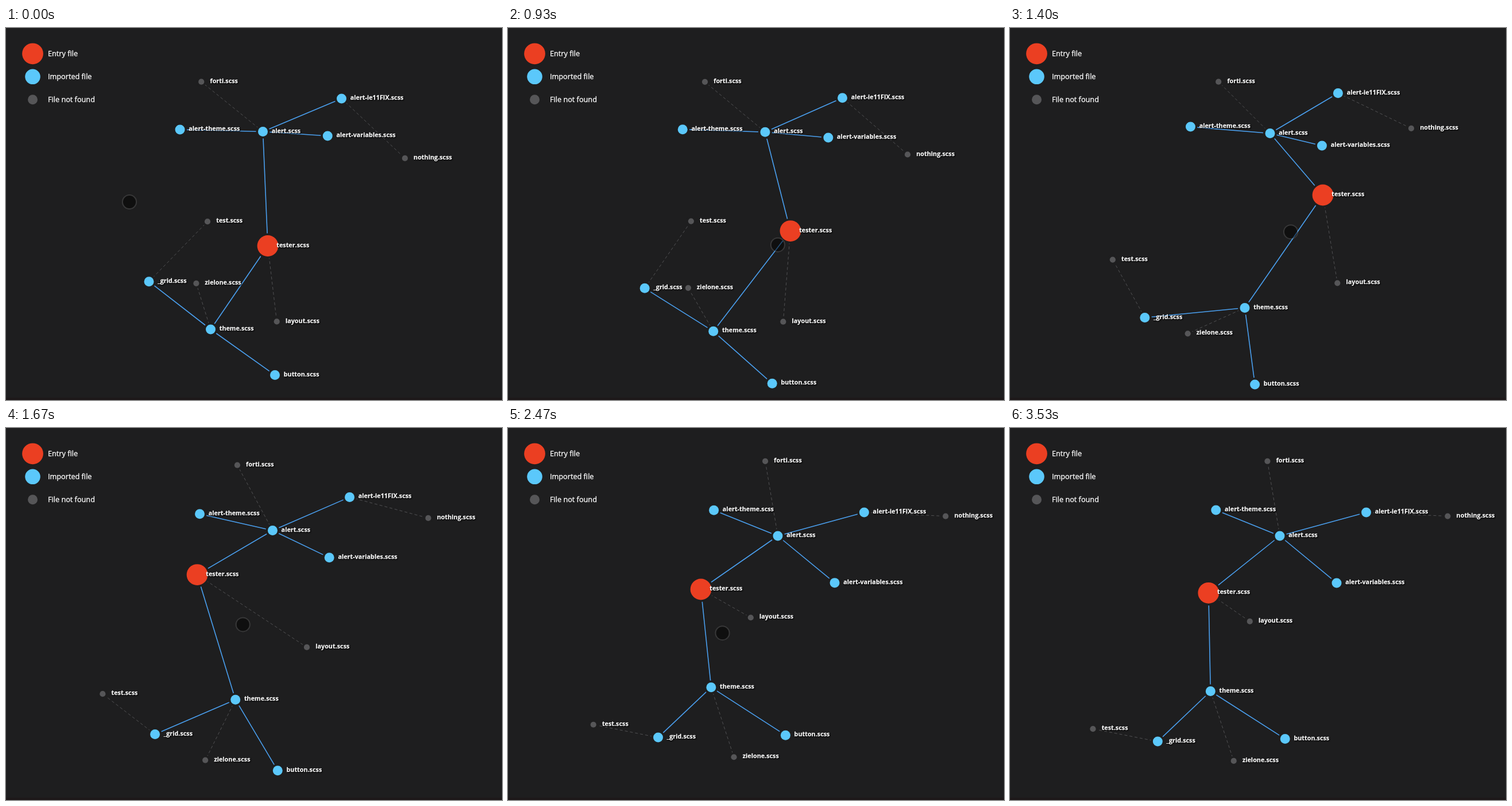
Recreate the animation shown at these times as an HTML page with a canvas. Size 864 px wide and 648 px high, loop 4.27 s.

```html
<!DOCTYPE html>
<html lang="en">
<head>
<meta charset="utf-8">
<title>Import graph</title>
<style>
  html, body { margin: 0; width: 100%; height: 100%; overflow: hidden; background: #1e1e1f; }
  canvas { display: block; }
</style>
</head>
<body>
<canvas id="stage" width="864" height="648"></canvas>
<script>
const ctx = document.getElementById('stage').getContext('2d');
const BG = '#1e1e1f';
const FONT = '"Open Sans", "Noto Sans", sans-serif';
const LOOP = 4270, STEP = 1000 / 15;
const GRAB = 730, PULLED = 1400, SETTLED = 2600, LEAVE = 2200, GONE = 3430;

const KINDS = {
  entry:    { color: '#eb3f22', r: 18.4, legendR: 18.4, label: 'Entry file' },
  imported: { color: '#5bc8fb', r: 8.5,  legendR: 13.3, label: 'Imported file' },
  missing:  { color: '#565658', r: 5.1,  legendR: 8.5,  label: 'File not found' }
};

const nodes = [];

function addNode(name, kind, parent, place) {
  const node = { name, parent, place, ...KINDS[kind], dashed: kind === 'missing' };
  nodes.push(node);
  return node;
}

const clamp01 = v => Math.min(1, Math.max(0, v));
const progress = (time, from, to) => clamp01((time - from) / (to - from));
const easeIn = (s, power) => s ** power;
const easeOut = (s, power) => 1 - (1 - s) ** power;
const easeBack = (s, pull) => 1 + (pull + 1) * (s - 1) ** 3 + pull * (s - 1) ** 2;

// Smooth curve through points [time, x, y], at rest at both ends.
function path(...points) {
  const last = points.length - 1;
  const slope = (i, axis) => i === 0 || i === last ? 0 :
    (points[i + 1][axis] - points[i - 1][axis]) / (points[i + 1][0] - points[i - 1][0]);
  return time => {
    const t = Math.min(points[last][0], Math.max(points[0][0], time));
    let i = 0;
    while (i < last - 1 && t >= points[i + 1][0]) i++;
    const a = points[i], b = points[i + 1], span = b[0] - a[0];
    const s = (t - a[0]) / span, mix = s * s * (3 - 2 * s);
    const along = axis => a[axis] + (b[axis] - a[axis]) * mix
      + span * s * (1 - s) * ((1 - s) * slope(i, axis) - s * slope(i + 1, axis));
    return { x: along(1), y: along(2) };
  };
}

// Start, pulled and settled value, gathering speed and then easing to rest.
function swing([start, pulled, settled], time) {
  return start
    + (pulled - start) * easeIn(progress(time, GRAB, PULLED), 1.7)
    + (settled - pulled) * easeOut(progress(time, PULLED, SETTLED), 2.5);
}

// Swings around another node: bearings in degrees, lengths in pixels.
function around(hub, bearings, lengths) {
  return time => {
    const angle = swing(bearings, time) * Math.PI / 180;
    const length = swing(lengths, time);
    return { x: hub.x + length * Math.cos(angle), y: hub.y + length * Math.sin(angle) };
  };
}

const drag = path([GRAB, 456, 379.5], [930, 491.5, 354], [PULLED, 545, 291],
  [1670, 332, 255.5], [2130, 328, 272.5], [2930, 345.8, 287.3]);

const tester = addNode('tester', 'entry', null, drag);
const alertNode = addNode('alert', 'imported', tester,
  path([GRAB, 447.5, 180.5], [PULLED, 453, 183.5], [1670, 464.5, 178.5], [2130, 470, 188]));
const theme = addNode('theme', 'imported', tester,
  path([GRAB, 356.5, 525], [930, 357.5, 528.5], [PULLED, 409, 487.5],
    [1670, 399.5, 473], [2130, 364, 449.5], [2930, 349.3, 458.5]));
addNode('layout', 'missing', tester, around(theme, [-6.7, -15, -60.6], [116, 167, 139.5]));

addNode('forti', 'missing', alertNode, around(alertNode, [219, 225, 260.6], [138, 127, 132]));
addNode('alert-theme', 'imported', alertNode, around(alertNode, [181.4, 184.7, 202], [144.5, 139, 120]));
addNode('alert-variables', 'imported', alertNode, around(alertNode, [3.8, 13.4, 39.6], [113, 93, 128.5]));
const fix = addNode('alert-ie11FIX', 'imported', alertNode,
  around(alertNode, [-22.8, -30.6, -15.2], [148.6, 137.6, 156]));
addNode('nothing', 'missing', fix, around(fix, [43.3, 25.7, 2.6], [151.7, 141.5, 142]));

const grid = addNode('_grid', 'imported', theme, around(theme, [217.8, 174.4, 136.4], [136, 175, 127]));
addNode('test', 'missing', grid, around(grid, [314.3, 241, 191], [146, 115.5, 115]));
addNode('zielone', 'missing', theme, around(theme, [252.6, 155.7, 71.6], [84, 109, 128]));
addNode('button', 'imported', theme, around(theme, [35.4, 82.5, 32.6], [137.4, 134.6, 154.2]));

// The pointer flies in, follows the dragged node at a smaller scale, then drops out.
function pointerAt(time) {
  const enter = progress(time, 0, 600), leave = progress(time, LEAVE, GONE);
  const from = drag(0), held = drag(Math.min(time, LEAVE));
  return {
    x: 215 + 242 * easeBack(enter, 1.5) + 0.36 * (held.x - from.x) - 85 * easeOut(leave, 2.4),
    y: 303 + 84 * easeOut(enter, 2) + 0.36 * (held.y - from.y) + 315 * easeIn(leave, 2.4)
  };
}

function disc(x, y, r, color) {
  ctx.fillStyle = color;
  ctx.beginPath();
  ctx.arc(x, y, r, 0, Math.PI * 2);
  ctx.fill();
}

function drawText(text, x, y, bold) {
  ctx.font = bold ? '700 10.8px ' + FONT : '400 12.7px ' + FONT;
  ctx.fillStyle = ctx.strokeStyle = '#fff';
  ctx.lineWidth = 0.3;
  ctx.strokeText(text, x, y);
  ctx.fillText(text, x, y);
}

function drawLink(from, to) {
  ctx.strokeStyle = to.dashed ? '#515153' : '#4a9fee';
  ctx.lineWidth = to.dashed ? 1 : 1.6;
  ctx.setLineDash(to.dashed ? [5, 4] : []);
  ctx.beginPath();
  ctx.moveTo(from.x, from.y);
  ctx.lineTo(to.x, to.y);
  ctx.stroke();
}

function drawNode(node) {
  disc(node.x, node.y, node.r + 3.5, BG);
  disc(node.x, node.y, node.r, node.color);
}

function drawLabels() {
  ctx.save();
  ctx.setLineDash([]);
  ctx.shadowColor = '#000';
  ctx.shadowBlur = 2;
  ctx.shadowOffsetX = ctx.shadowOffsetY = 1;
  for (const node of nodes) drawText(node.name + '.scss', node.x + 15.2, node.y + 2.1, true);
  ctx.restore();
}

function drawLegend() {
  ctx.setLineDash([]);
  Object.values(KINDS).forEach((kind, i) => {
    const y = 45 + i * 40;
    disc(46.5, y - 0.2, kind.legendR, kind.color);
    drawText(kind.label, 73, y + 4.3, false);
  });
}

function drawPointer(time) {
  const { x, y } = pointerAt(time);
  disc(x, y, 12, 'rgba(0, 0, 0, 0.5)');
  ctx.lineWidth = 2;
  ctx.strokeStyle = 'rgba(255, 255, 255, 0.14)';
  ctx.beginPath();
  ctx.arc(x, y, 12, 0, Math.PI * 2);
  ctx.stroke();
}

function draw(time) {
  ctx.fillStyle = BG;
  ctx.fillRect(0, 0, 864, 648);
  ctx.fillStyle = '#1d1819';
  ctx.fillRect(0, 644, 864, 4);

  for (const node of nodes) Object.assign(node, node.place(time));
  for (const node of nodes) if (node.parent) drawLink(node.parent, node);
  nodes.forEach(drawNode);
  drawLabels();
  drawLegend();
  drawPointer(time);
}

const start = performance.now();
function tick() {
  const time = (performance.now() - start) % LOOP;
  draw(Math.floor((time + 4) / STEP) * STEP);
  requestAnimationFrame(tick);
}
tick();
</script>
</body>
</html>
```
